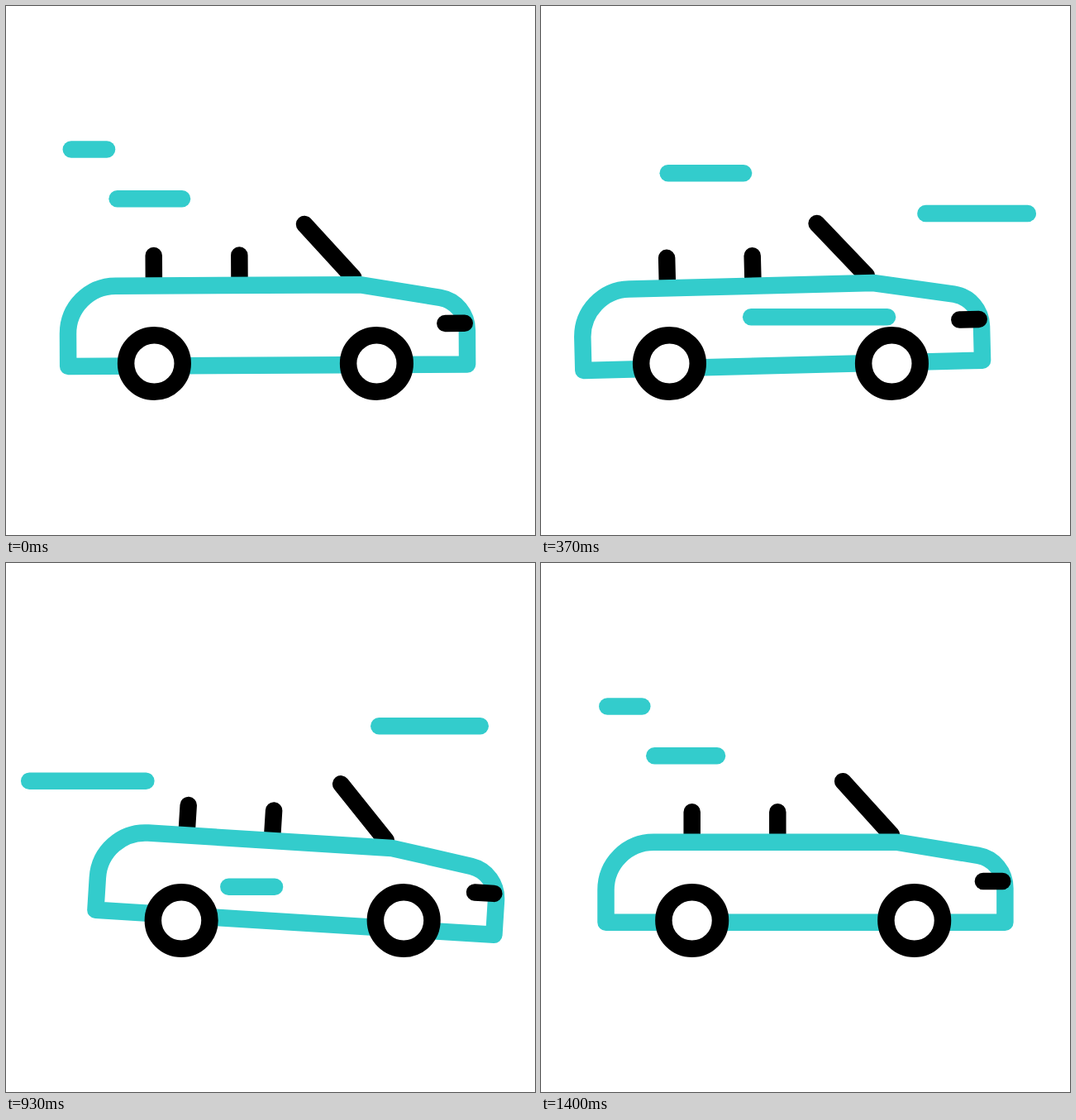
Recreate the animation shown at these times as an HTML page. Size 640x640 px, loop 1670 ms.

```html
<!DOCTYPE html>
<html lang="en">
<head>
<meta charset="utf-8">
<title>Convertible</title>
<style>
  html, body { margin: 0; width: 100%; height: 100%; overflow: hidden; background: #fff; }
  svg { display: block; width: 100%; height: 100%; }
  svg * { fill: none; stroke: #000; stroke-width: 20.5; stroke-linecap: round; stroke-linejoin: round; }
  .teal, #wind line { stroke: #3cc; }
  circle { fill: #fff; }
</style>
</head>
<body>
<svg viewBox="0 0 640 640">
  <g id="car">
    <g id="body">
      <path d="M182.7 301.3V334M286.3 301.3V334M365.2 264.2L424 329"/>
      <path class="teal" d="M78.5 434.8V395.5C78.5 363.6 104.3 337.8 136.2 337.8H431.5L529 353.9C548 357.3 561.4 374 561.4 393.5V434.8Z"/>
      <path d="M534.9 385H558.3"/>
    </g>
    <circle cx="182.7" cy="432.5" r="34.3"/>
    <circle cx="451.7" cy="432.5" r="34.3"/>
  </g>
  <g id="wind"></g>
</svg>
<script>
  const LOOP = 1670, FPS = 30, LAST = 42;
  const HEAD = 9.2, TAIL = 8.1, RUN = 199.6;
  const NEVER = 99, DONE = -99;

  // Pose keys: [step, value]
  const shift = [[-0.33, 0], [8.27, -51.2], [18.6, 29.4], [24.7, 14.6], [33, 42.8], [42.7, 0]];
  const tilt = [[-0.33, 0], [8.27, -4.53], [17.15, 3.56], [33, 3.56], [42.7, 0]];

  // Wind streaks run leftwards; head and tail are the steps at which each end sets off
  const streaks = [
    { y: 173.5, x: 122.3, run: 43.5, head: DONE, tail: 0.67, tailTime: 7.2 },
    { y: 233.2, x: 213, run: 78.4, head: DONE, tail: 2.73 },
    { y: 202.2, x: 353.3, head: 1.67, tail: 7.72 },
    { y: 376.2, x: 432.8, head: 4.65, tail: 10.7 },
    { y: 251, x: 588.8, head: 6.67, tail: 12.7 },
    { y: 391.8, x: 468.9, head: 17.67, tail: 23.72 },
    { y: 263.7, x: 227.8, head: 19.65, tail: 26.1 },
    { y: 197.2, x: 573.7, head: 23.7, tail: 30.1 },
    { y: 233.2, x: 213, run: 75.7, head: 29.25, tail: NEVER },
    { y: 173.5, x: 122.3, run: 42, head: 33.3, tail: NEVER }
  ];

  const car = document.getElementById('car');
  const body = document.getElementById('body');
  const wind = document.getElementById('wind');

  for (const s of streaks) {
    s.el = document.createElementNS('http://www.w3.org/2000/svg', 'line');
    s.el.setAttribute('y1', s.y);
    s.el.setAttribute('y2', s.y);
    wind.append(s.el);
  }

  function ease(u) {
    u = Math.min(1, Math.max(0, u));
    return u * u * (3 - 2 * u);
  }

  function valueAt(keys, k) {
    let v = keys[0][1];
    for (let i = 1; i < keys.length; i++) {
      const [a, from] = keys[i - 1], [b, to] = keys[i];
      v += (to - from) * ease((k - a) / (b - a));
    }
    return v;
  }

  function drawStreak({ el, x, run = RUN, head, tail, tailTime = TAIL }, k) {
    const h = ease((k - head) / HEAD), t = ease((k - tail) / tailTime);
    el.setAttribute('x1', x - run * h);
    el.setAttribute('x2', x - run * t);
    el.setAttribute('visibility', h > 0 && t < 1 ? 'visible' : 'hidden');
  }

  function draw(ms) {
    // Stepped at 30 per second, resting on the last step
    const k = 1 + Math.min(LAST, Math.floor((ms % LOOP + 4) * FPS / 1000));
    car.setAttribute('transform', `translate(${valueAt(shift, k)} 0)`);
    body.setAttribute('transform', `rotate(${valueAt(tilt, k)} 320 434.6)`);
    for (const s of streaks) drawStreak(s, k);
  }

  const start = performance.now();
  function tick() {
    draw(performance.now() - start);
    requestAnimationFrame(tick);
  }
  tick();
</script>
</body>
</html>
```
